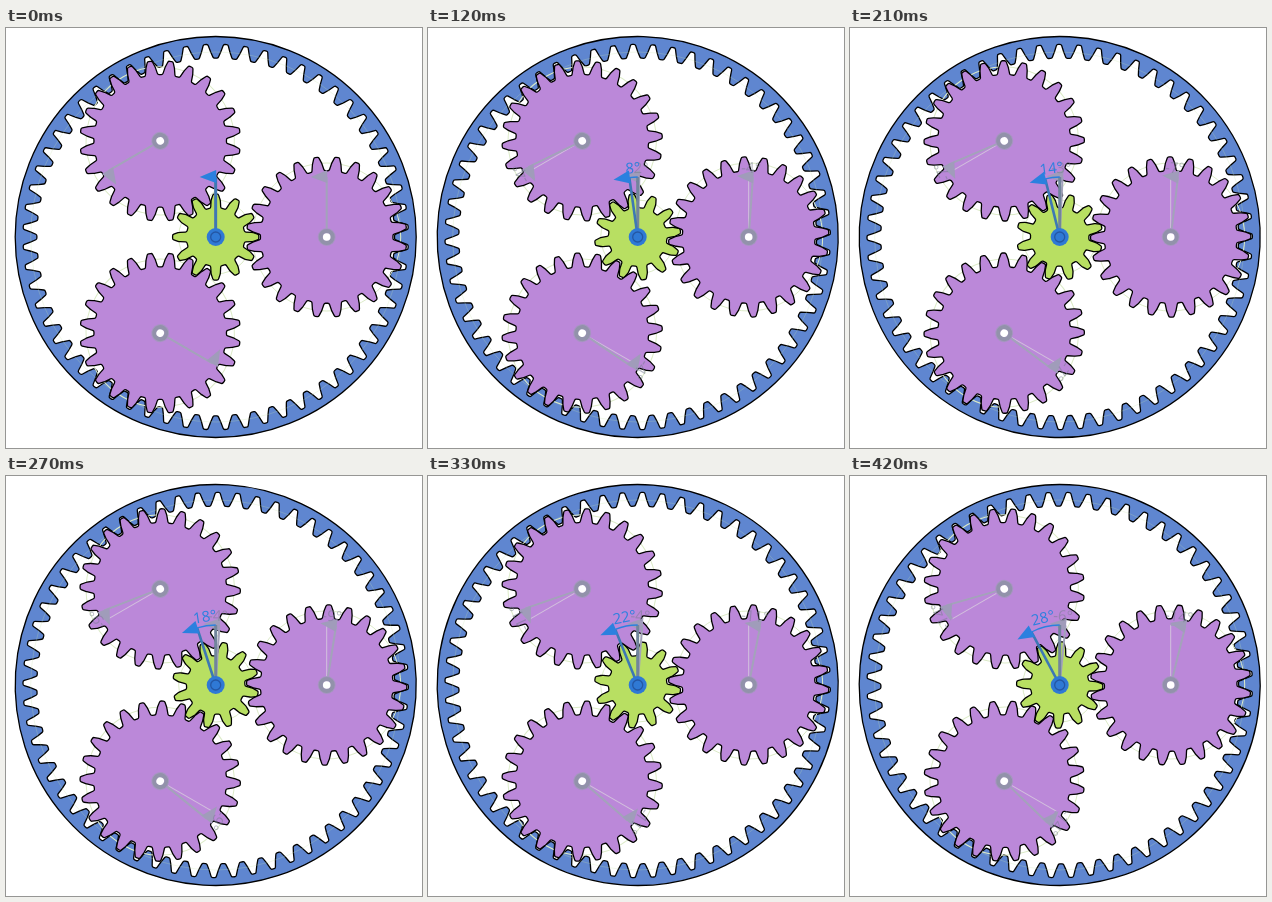
These frames come from a looping animation (416x420 px, 0.45 s). An HTML page with a canvas:

```html
<!DOCTYPE html>
<html lang="en">
<head>
<meta charset="utf-8">
<title>Planetary gear</title>
<style>
  html, body { margin: 0; width: 100%; height: 100%; overflow: hidden; background: #fff; }
  canvas { display: block; }
</style>
</head>
<body>
<canvas id="stage" width="416" height="420"></canvas>
<script>
const ctx = document.getElementById('stage').getContext('2d');
const TAU = Math.PI * 2, DEG = Math.PI / 180;
const CENTER = { x: 209.7, y: 209 }, DISTANCE = 111;
const SUN = 12, PLANET = 24, RING = 60;
const MODULE = 2 * DISTANCE / (SUN + PLANET);
const ARM = 60, STEP_MS = 30, STEPS = 15;

const pitchRadius = teeth => teeth * MODULE / 2;

// Closed outline of trapezoid teeth with rounded corners; widths are fractions of the tooth pitch.
function gearPath(teeth, { addendum = 1, dedendum = 1.25, tip = .11, root = .36, phase = 0 }) {
  const r = pitchRadius(teeth), path = new Path2D(), points = [];
  const add = (turn, radius) => {
    const a = turn * TAU / teeth;
    points.push([radius * Math.cos(a), radius * Math.sin(a)]);
  };
  for (let i = 0; i < teeth; i++) {
    const t = i + phase;
    add(t - root, r - dedendum * MODULE);
    add(t - .24, r);
    add(t - tip, r + addendum * MODULE);
    add(t + tip, r + addendum * MODULE);
    add(t + .24, r);
    add(t + root, r - dedendum * MODULE);
  }
  const [last, first] = [points[points.length - 1], points[0]];
  path.moveTo((last[0] + first[0]) / 2, (last[1] + first[1]) / 2);
  points.forEach(([x, y], i) => {
    const next = points[(i + 1) % points.length];
    path.arcTo(x, y, ...next, i % 3 === 1 ? 8 : 1.8);
  });
  path.closePath();
  return path;
}

const sunPath = gearPath(SUN, { root: .33 });
const planetPath = gearPath(PLANET, { phase: .5 });
const ringPath = gearPath(RING, { addendum: 1.25, dedendum: 1, root: .38, phase: .5 });
ringPath.moveTo(200.5, 0);
ringPath.arc(0, 0, 200.5, 0, TAU);

function at(x, y, angle, draw) {
  ctx.save();
  ctx.translate(x, y);
  ctx.rotate(angle * DEG);
  draw();
  ctx.restore();
}

function gear(path, angle, color) {
  at(0, 0, angle, () => {
    ctx.fillStyle = color;
    ctx.strokeStyle = '#000';
    ctx.lineWidth = 1.3;
    ctx.fill(path, 'evenodd');
    ctx.stroke(path);
  });
}

function disc(radius, color) {
  ctx.beginPath();
  ctx.arc(0, 0, radius, 0, TAU);
  ctx.fillStyle = color;
  ctx.fill();
}

function circle(radius, color, width = 1) {
  ctx.beginPath();
  ctx.arc(0, 0, radius, 0, TAU);
  ctx.strokeStyle = color;
  ctx.lineWidth = width;
  ctx.stroke();
}

function spoke(angle, color, width) {
  at(0, 0, angle, () => {
    ctx.beginPath();
    ctx.moveTo(0, 0);
    ctx.lineTo(0, -ARM);
    ctx.strokeStyle = color;
    ctx.lineWidth = width;
    ctx.stroke();
  });
}

// Arm with arrowhead, swept arc and angle label; negative angles turn left.
function pointer(angle, { arm, head, text, width }) {
  spoke(angle, arm, width);
  ctx.beginPath();
  ctx.arc(0, 0, ARM, -Math.PI / 2, (angle - 90) * DEG, angle < 0);
  ctx.strokeStyle = head;
  ctx.lineWidth = 1.3;
  ctx.stroke();
  at(0, 0, angle, () => {
    ctx.beginPath();
    ctx.moveTo(-16, -ARM);
    ctx.lineTo(.5, -ARM - 7);
    ctx.lineTo(.5, -ARM + 6);
    ctx.fillStyle = head;
    ctx.fill();
  });
  if (angle) at(0, 0, angle / 2, () => {
    ctx.fillStyle = text;
    ctx.font = '15px "Open Sans", sans-serif';
    ctx.textAlign = 'center';
    ctx.fillText(Math.round(-angle) + '°', 0, -ARM - 4);
  });
}

const gray = { arm: '#a3a3ba', head: '#a09cba', text: 'rgba(120,125,145,.55)', width: 2 };
const blue = { arm: '#3d78b4', head: '#2b80df', text: '#2b80df', width: 2.6 };

function eachPlanet(draw) {
  for (let k = 0; k < 3; k++) {
    at(0, 0, -120 * k, () => at(DISTANCE, 0, 0, draw));
  }
}

function drawScene(turn) {
  const planetTurn = turn * SUN / PLANET, ringTurn = turn * SUN / RING;
  ctx.fillStyle = '#fff';
  ctx.fillRect(0, 0, 416, 420);
  at(CENTER.x, CENTER.y, 0, () => {
    gear(ringPath, ringTurn, '#5f86d0');
    const guide = '#dcebc8';
    circle(pitchRadius(RING), 'rgba(200,225,170,.25)');
    eachPlanet(() => circle(pitchRadius(PLANET), guide));
    circle(pitchRadius(SUN), guide);
    gear(sunPath, -turn, '#b8df62');
    eachPlanet(() => {
      gear(planetPath, planetTurn, '#bb88d9');
      if (planetTurn) spoke(0, '#d3c2dd', 1);
      pointer(planetTurn, gray);
      disc(9, '#a795c2');
      circle(6, '#9292aa', 4);
      disc(3.8, '#fff');
    });
    pointer(ringTurn, gray);
    spoke(0, '#71859c', 3);
    pointer(-turn, blue);
    disc(9, '#2f79d5');
    circle(5, '#2457a4', 1.3);
  });
}

function tick(now) {
  drawScene(Math.floor(now / STEP_MS) % STEPS * 2);
  requestAnimationFrame(tick);
}
requestAnimationFrame(tick);
</script>
</body>
</html>
```
